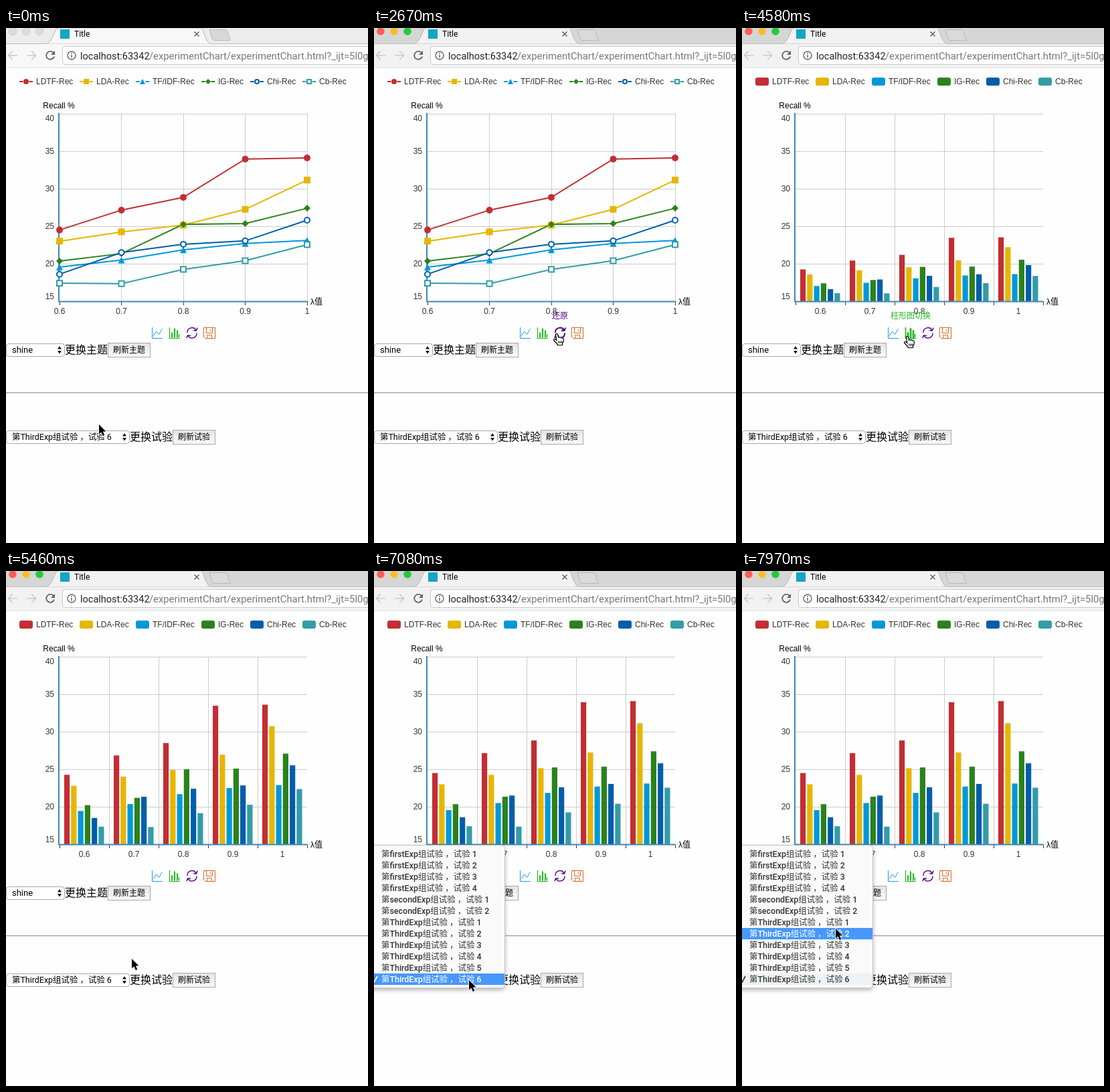
Write an HTML page that moves like this. It is 541 by 769 pixels and loops after 8 s.

```html
<!DOCTYPE html>
<html lang="zh-CN">
<head>
<meta charset="utf-8">
<title>Title</title>
<style>
  html, body { margin: 0; width: 100%; height: 100%; overflow: hidden; background: #fefefe; }
  svg { display: block; }
  text { white-space: pre; }
  .chart { font: 12px "Liberation Sans", Arial, "Noto Sans CJK SC", sans-serif; fill: #333; }
  .ui { font: 12.45px Roboto, "Noto Sans CJK SC", "Noto Sans CJK JP", sans-serif; fill: #000; }
  .label { font: 16px "Noto Sans CJK SC", "Noto Sans CJK JP", sans-serif; }
</style>
</head>
<body>
<svg id="stage" width="541" height="769" viewBox="0 0 541 769"></svg>
<script>
const LOOP = 8000, STEP = 147.6;
const BASE = 408, LEFT = 80, RIGHT = 450;
const SERIES = [
  { name: 'LDTF-Rec', color: '#c12e34', x: 20, symbol: 'circle', data: [24.5, 27.15, 28.85, 33.95, 34.1] },
  { name: 'LDA-Rec', color: '#e6b600', x: 110, symbol: 'square', data: [23, 24.25, 25.15, 27.25, 31.15] },
  { name: 'TF/IDF-Rec', color: '#0098d9', x: 194, symbol: 'triangle', data: [19.55, 20.5, 21.85, 22.7, 23.1] },
  { name: 'IG-Rec', color: '#2b821d', x: 292, symbol: 'diamond', data: [20.35, 21.35, 25.25, 25.35, 27.4] },
  { name: 'Chi-Rec', color: '#005eaa', x: 365, symbol: 'ring', data: [18.6, 21.5, 22.6, 23.05, 25.8] },
  { name: 'Cb-Rec', color: '#339ca8', x: 443, symbol: 'box', data: [17.4, 17.35, 19.25, 20.4, 22.55] }
];
const CATEGORIES = ['0.6', '0.7', '0.8', '0.9', '1'];
const OPTIONS = [['first', 4], ['second', 2], ['Third', 6]].flatMap(([group, count]) =>
  Array.from({ length: count }, (_, i) => `第${group}Exp组试验 ，试验 ${i + 1}`));

// Each pointer pose is held until the next one: time, x, y, shape
const POINTER = [
  [0, 139, 592], [150, 141, 595], [300, 185, 560], [450, 235, 485], [600, 251, 457],
  [1790, 268, 480], [1930, 330, 548], [2080, 396, 608], [2230, 407, 614], [2370, 372, 570],
  [2520, 300, 488], [2670, 273, 456, 'hand'], [2810, 274, 457, 'hand'],
  [2960, 268, 456], [3100, 256, 457], [3250, 249, 457],
  [3990, 247, 459, 'hand'], [4140, 247, 460, 'hand'],
  [4870, 243, 472], [5020, 230, 500], [5170, 212, 535], [5310, 196, 566], [5460, 188, 579],
  [5610, 178, 602], [5760, 167, 624], [5900, 158, 623], [6050, 151, 617], [6200, 146, 613],
  [6640, 143, 611], [7080, 142, 611],
  [7520, 142, 597], [7670, 142, 578], [7820, 141, 557], [7970, 140, 534]
];

const yOf = value => BASE - (value - 15) * 11.2;
const line = (x1, y1, x2, y2, stroke, width = 1) =>
  `<path d="M${x1} ${y1}L${x2} ${y2}" stroke="${stroke}" stroke-width="${width}"/>`;
const rect = (x, y, w, h, fill, extra = '') =>
  `<rect x="${x}" y="${y}" width="${w}" height="${h}" fill="${fill}" ${extra}/>`;
const text = (x, y, content, extra = '') => `<text x="${x}" y="${y}" ${extra}>${content}</text>`;
const group = (id, content, extra = '') => `<g id="${id}" ${extra}>${content}</g>`;

function symbol(kind, x, y, r, color) {
  const outline = `stroke="${color}" stroke-width="2"`;
  switch (kind) {
    case 'circle': return `<circle cx="${x}" cy="${y}" r="${r}" fill="${color}"/>`;
    case 'ring': return `<circle cx="${x}" cy="${y}" r="${r - 1}" fill="#fff" ${outline}/>`;
    case 'square': return rect(x - r, y - r, 2 * r, 2 * r, color);
    case 'box': return rect(x - r + 1, y - r + 1, 2 * r - 2, 2 * r - 2, '#fff', outline);
    case 'triangle': return `<path d="M${x} ${y - r}l${r} ${2 * r}h${-2 * r}z" fill="${color}"/>`;
    default: return `<path d="M${x} ${y - r}l${r} ${r}l${-r} ${r}l${-r} ${-r}z" fill="${color}"/>`;
  }
}

function axes(splits, labels) {
  let out = '';
  for (let y = 128.5; y < BASE; y += 56) out += line(LEFT, y, RIGHT, y, '#ccc');
  splits.forEach(x => {
    const px = Math.floor(x) + .5;
    out += line(px, BASE, px, 414, '#333');
    if (x > LEFT && (x < RIGHT || labels[0] === LEFT)) out += line(px, 128, px, BASE, '#ccc');
  });
  return out + labels.map((x, i) => text(x, 427, CATEGORIES[i], 'text-anchor="middle"')).join('');
}

const axisLines = () => line(79, 127, 79, 409, '#48b', 2) + line(78, BASE + .5, 451, BASE + .5, '#48b', 2);

function lineChart() {
  const xs = CATEGORIES.map((_, i) => LEFT + i * 92.5);
  let out = axes(xs, xs) + axisLines();
  for (const { data, color } of SERIES) {
    const points = data.map((v, i) => `${xs[i]},${yOf(v)}`).join(' ');
    out += `<polyline points="${points}" fill="none" stroke="${color}" stroke-width="2"/>`;
  }
  for (const { data, color, symbol: kind, x, name } of SERIES) {
    out += data.map((v, i) => symbol(kind, xs[i], yOf(v), 5, color)).join('');
    out += line(x, 80, x + 5.5, 80, color, 2) + line(x + 14.5, 80, x + 20, 80, color, 2);
    out += symbol(kind, x + 10, 80, 4, color);
  }
  return out;
}

function barChart() {
  const splits = Array.from({ length: 6 }, (_, i) => LEFT + i * 74);
  const labels = CATEGORIES.map((_, i) => LEFT + 37 + i * 74);
  let bars = '', legend = '';
  SERIES.forEach(({ data, color, x }, s) => {
    legend += rect(x, 74, 20, 12, color, 'rx="3"');
    data.forEach((v, i) => {
      const h = BASE - yOf(v);
      bars += rect(splits[i] + 7 + s * 10.26, -h, 8.2, h, color);
    });
  });
  return axes(splits, labels) + group('bars', bars) + axisLines() + legend;
}

function chartText() {
  const ticks = [[40, 139], [35, 188], [30, 244], [25, 300], [20, 356], [15, 405]];
  return ticks.map(([v, y]) => text(72, y, v, 'text-anchor="end"')).join('') +
    SERIES.map(s => text(s.x + 25, 84, s.name)).join('') +
    text(79, 120, 'Recall %', 'text-anchor="middle" fill="#000"') + text(455, 413, 'λ值', 'fill="#000"');
}

const icon = (id, color, d) => `<path id="${id}" d="${d}" fill="none" stroke="${color}"/>`;
function toolbox() {
  return icon('lineIcon', '#1e90ff', 'M218.5 447V463.5H234M220 460L224.5 453L228.5 457.5L233.5 449.5') +
    icon('barIcon', '#2b2', 'M244.5 447V463.5H260M247.5 455v7h1v-7zM251.5 449v13h1v-13zM255.5 452v10h1v-10zM258.5 457v5') +
    icon('restoreIcon', '#4b0082', 'M271 455A7 7 0 0 1 284 451M286 447.5L284.5 452L280 451.5' +
      'M285 455.5A7 7 0 0 1 272 459.5M270 463L271.5 459L276 459.5') +
    icon('saveIcon', '#d2691e', 'M295.5 447.5H312.5V463.5H298L295.5 461ZM299.5 447.5V455.5H308.5V447.5' +
      'M300.5 463.5V458.5H307.5V463.5M305.5 450V453');
}

function browser() {
  const tab = 'M60 23.5C68 22 70 10 76 0H293C298 12 299 22 307 23.5';
  const light = i => `<circle class="light" cx="${10 + i * 20}" cy="5" r="5.8"/>`;
  return rect(0, 0, 541, 24, '#ececec', 'id="strip"') + line(0, 23.5, 541, 23.5, '#bdbdbd') +
    `<path id="tab" d="${tab}" stroke="#b4b4b4"/>` +
    rect(0, 24, 541, 36, '#f8f8f8', 'id="toolbar"') + line(0, 59.5, 541, 59.5, '#e2e2e2') +
    '<path id="newTab" d="M304 2.5H327Q330 2.5 331 5L335.500 18.500H312Q309 18.500 308 16Z" stroke="#b8b8b8"/>' +
    [0, 1, 2].map(light).join('') + rect(81, 2, 14, 14, '#12a5c4') +
    text(102, 13, 'Title', 'style="font-size:12px"') +
    '<path d="M281.500 5.500l7 7m0-7l-7 7" stroke="#555" stroke-width="1.300"/>' +
    '<path d="M17 41H4M10 34.500L3.500 41L10 47.500M31 41H44M38 34.500L44.500 41L38 47.500" fill="none" stroke="#ccc" stroke-width="1.700"/>' +
    '<path d="M71.500 38A6 6 0 1 0 72 42.500" fill="none" stroke="#666" stroke-width="1.800"/><path d="M73 34V40H67Z" fill="#666"/>' +
    rect(84.5, 27.5, 470, 27, '#fff', 'rx="4" stroke="#c8c8c8"') +
    '<circle cx="98" cy="41" r="6" fill="none" stroke="#666" stroke-width="1.400"/>' +
    line(98, 40, 98, 44.5, '#666', 1.5) + line(98, 37, 98, 38.7, '#666', 1.5) +
    text(111, 46.5, 'localhost:63342', 'style="font-size:14.5px" fill="#222"') +
    text(214, 46.5, '/experimentChart/experimentChart.html?_ijt=5l0g', 'style="font-size:14.8px;fill:#777"');
}

function formRow(y, width, value, size, label, action) {
  const ax = width - 8, bx = width + 64;
  return rect(.5, y + 1.5, width - 1, 19, '#fff', 'rx="4" stroke="#a8a8a8"') +
    text(9, y + 15.3, value, `style="font-size:${size}px"`) +
    `<path d="M${ax - 3} ${y + 9.5}l3-4.500l3 4.500zM${ax - 3} ${y + 12}l3 4.500l3-4.500z" fill="#111"/>` +
    text(width, y + 15.5, label, 'class="label"') +
    rect(bx + .5, y + .5, 63, 21, 'url(#button)', 'stroke="#a9a9a9"') +
    text(bx + 8, y + 15.3, action, 'style="font-size:12px"');
}

function popup() {
  const rowText = (s, i) => text(11, 427.3 + i * 17, s, 'class="option"');
  return rect(-10, 409.5, 205.5, 213, '#fafafa', 'rx="5" stroke="#c4c4c4" filter="url(#shadow)"') +
    rect(0, 601, 195, 17, '#eef2f5') + rect(0, 0, 195, 17, '#4897fb', 'id="highlight"') +
    '<path id="check" d="M-3 609.500L.5 613.500L5 605" fill="none" stroke-width="1.700"/>' +
    `<g font-weight="500">${OPTIONS.map(rowText).join('')}</g>`;
}

const stage = document.getElementById('stage');
stage.innerHTML = `<defs>
  <linearGradient id="button" x2="0" y2="1"><stop stop-color="#e4e4e4"/><stop offset=".5" stop-color="#f1f1f1"/><stop offset="1" stop-color="#f8f8f8"/></linearGradient>
  <filter id="shadow" x="-20%" y="-20%" width="140%" height="140%"><feDropShadow dx="0" dy="3" stdDeviation="3" flood-opacity=".28"/></filter>
  </defs>` + rect(0, 0, 541, 769, '#fefefe') +
  group('page', browser() + formRow(470, 88, 'shine', 13, '更换主题', '刷新主题') +
    line(0, 544.5, 541, 544.5, '#9a9a9a') + line(0, 545.5, 541, 545.5, '#e8e8e8') +
    formRow(600, 185, OPTIONS[11], 12.45, '更换试验', '刷新试验'), 'class="ui"') +
  group('chart', group('lineChart', lineChart()) + group('barChart', barChart()) + chartText() + toolbox() +
    text(278, 434, '还原', 'id="restoreTip" text-anchor="middle" fill="#4b0082"') +
    text(252, 434, '柱形图切换', 'id="barTip" text-anchor="middle" fill="#2b2"'), 'class="chart"') +
  group('popup', popup(), 'class="ui"') +
  '<path id="arrow" d="M0 0V14.500L3.400 11.400L5.800 17L8.300 16L5.900 10.600H10.400Z" fill="#000" stroke="#fff" stroke-width="1.600" paint-order="stroke"/>' +
  '<path id="hand" d="M-1.500 1.200Q0-.6 1.500 1.200L2.500 6Q4 4.800 5.200 6.300Q7 5.300 8 7Q10.500 6.500 10.500 9Q10.500 13 8.500 15V17.500H1V16Q-2 13-4.500 10Q-4.500 7.600-2 8.500L-.2 10.500ZM3 11.500v3M5.300 11.500v3M7.500 11.500v3" fill="#fff" stroke="#000" stroke-width="1.200"/>';

const el = id => document.getElementById(id);
const set = (id, name, value) => el(id).setAttribute(name, value);
const show = (id, on) => { el(id).style.display = on ? '' : 'none'; };
const between = (t, from, to) => t >= from && t < to;
const lights = [...document.querySelectorAll('.light')];
const options = [...document.querySelectorAll('.option')];

function paintWindow(active) {
  set('strip', 'fill', active ? '#d5d7d5' : '#ececec');
  set('tab', 'fill', active ? '#f2f2f2' : '#f8f8f8');
  set('toolbar', 'fill', active ? '#f2f2f2' : '#f8f8f8');
  set('newTab', 'fill', active ? '#d9dbd7' : '#d8d8d8');
  lights.forEach((light, i) => {
    light.setAttribute('fill', active ? ['#fe5f57', '#fdbc2e', '#28c840'][i] : '#dcdcdc');
    light.setAttribute('stroke', active ? 'none' : '#cfcfcf');
  });
}

function render(t) {
  paintWindow(t >= 890);

  const barMode = t >= 4430;
  show('lineChart', !barMode);
  show('barChart', barMode);
  const tick = Math.floor((t + 10) / STEP) * STEP;
  const grown = 1 - 2 ** (-10 * Math.max(0, Math.min(1, (tick - 4405) / 2000)));
  set('bars', 'transform', `translate(0 ${BASE}) scale(1 ${grown})`);

  const onRestore = between(t, 2670, 2960), onBar = between(t, 3990, 4870);
  show('restoreTip', onRestore);
  show('barTip', onBar);
  set('restoreIcon', 'stroke-width', onRestore ? 2 : 1.4);
  set('barIcon', 'stroke-width', onBar ? 1.7 : 1.2);

  const [, x, y, shape] = POINTER.findLast(p => p[0] <= t);
  show('hand', shape === 'hand');
  show('arrow', shape !== 'hand');
  set(shape || 'arrow', 'transform', `translate(${x} ${y})`);

  show('popup', t >= 6780);
  const chosen = Math.floor((y - 414) / 17);
  set('highlight', 'y', 414 + chosen * 17);
  set('check', 'stroke', chosen === 11 ? '#fff' : '#333');
  options.forEach((option, i) => { option.style.fill = i === chosen ? '#fff' : '#333'; });
}

function frame(now) {
  render(now % LOOP);
  requestAnimationFrame(frame);
}
render(0);
requestAnimationFrame(frame);
</script>
</body>
</html>
```
